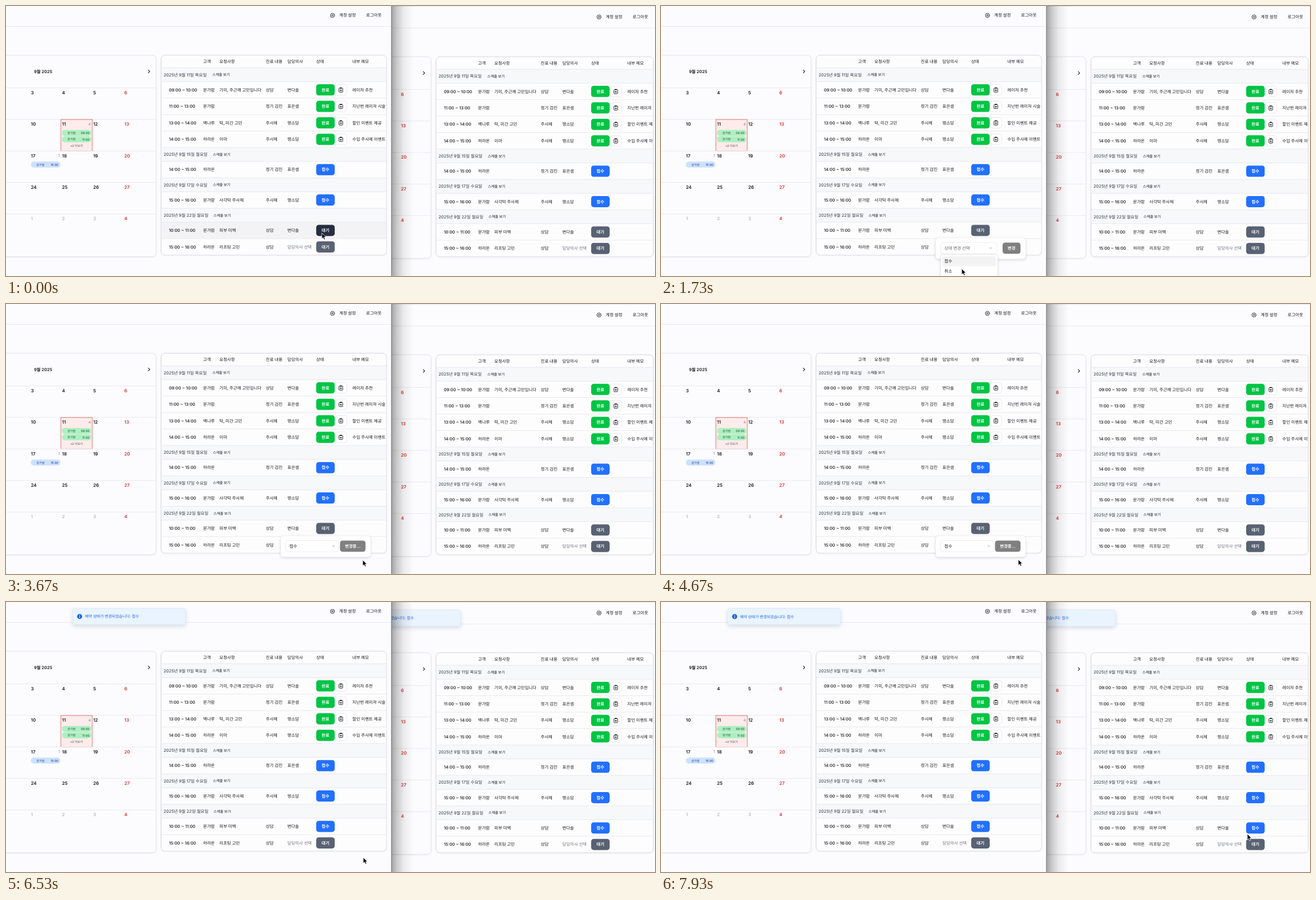
These frames come from a looping animation (1159 px wide and 483 px high, 8000 ms). An HTML page:

```html
<!DOCTYPE html>
<html lang="ko">
<head>
<meta charset="utf-8">
<title>예약 관리</title>
<style>
  html, body { margin: 0; width: 100%; height: 100%; overflow: hidden; background: #fcfbfd; }
  svg { display: block; width: 1159px; height: 483px; }
  text { font-family: Inter, 'Noto Sans CJK KR', 'Noto Sans CJK JP', sans-serif; text-rendering: geometricPrecision; white-space: pre; }
</style>
</head>
<body>
<svg id="stage" viewBox="0 0 1159 483"></svg>
<script>
const LOOP = 8000;
const INK = '#17171b', LINE = '#e9e9ee', RED = '#dc2f2f';
const GREEN = '#00c444', BLUE = '#2270ff', SLATE = '#596273', DARK = '#252f41';

const text = (x, cy, s, { size = 7.5, weight = 500, fill = INK, anchor = 'start' } = {}) =>
  `<text x="${x}" y="${cy + size * 0.365}" font-size="${size}" font-weight="${weight}" fill="${fill}" text-anchor="${anchor}">${s}</text>`;
const rect = (x, y, w, h, fill, r = 0, extra = '') =>
  `<rect x="${x}" y="${y}" width="${w}" height="${h}" rx="${r}" fill="${fill}" ${extra}/>`;
const hline = (x1, x2, y) => rect(x1, y - 0.5, x2 - x1, 1, LINE);
const stroke = (d, color, width = 1) =>
  `<path d="${d}" fill="none" stroke="${color}" stroke-width="${width}" stroke-linecap="round" stroke-linejoin="round"/>`;
const button = (x, cy, w, label, fill, id = '') =>
  `<g ${id && `id="${id}"`}>${rect(x, cy - 10, w, 20, fill, 4.5)}${text(x + w / 2, cy, label, { weight: 600, fill: '#fff', anchor: 'middle' })}</g>`;
const group = (id, body, attrs = '') => `<g id="${id}" ${attrs}>${body}</g>`;

function gear(cx, cy) {
  const points = [];
  for (let i = 0; i < 32; i++) {
    const a = (i + 0.5) * Math.PI / 16, r = i % 4 < 2 ? 4 : 3.1;
    points.push(`${cx + r * Math.cos(a)} ${cy + r * Math.sin(a)}`);
  }
  return stroke(`M${points.join('L')}Z`, '#222', 0.9) +
    `<circle cx="${cx}" cy="${cy}" r="1.3" fill="none" stroke="#222" stroke-width=".9"/>`;
}

function clipboard(cx, cy) {
  return rect(cx - 9.5, cy - 9.5, 20, 19, '#fff', 4.5, `stroke="${LINE}"`) +
    rect(cx - 3.3, cy - 3.3, 6.6, 7.4, 'none', 1, `stroke="${INK}" stroke-width=".95"`) +
    rect(cx - 1.6, cy - 4.4, 3.2, 2, INK, 0.6) +
    stroke(`M${cx - 1.4} ${cy + 0.8}h2.8M${cx} ${cy - 0.6}v2.8`, INK, 0.95);
}

// Rows with one entry are date headings.
const rows = [
  ['2025년 9월 11일 목요일'],
  ['09:00 ~ 10:00', '문가람', '기미, 주근깨 고민입니다', '상담', '변다솔', '완료', '레이저 추천'],
  ['11:00 ~ 13:00', '문가람', '', '정기 검진', '표은샘', '완료', '지난번 레이저 시술'],
  ['13:00 ~ 14:00', '백나루', '턱, 미간 고민', '주사제', '맹소담', '완료', '할인 이벤트 제공'],
  ['14:00 ~ 15:00', '하라온', '이마', '주사제', '맹소담', '완료', '수입 주사제 이벤트'],
  ['2025년 9월 15일 월요일'],
  ['14:00 ~ 15:00', '하라온', '', '정기 검진', '표은샘', '접수', ''],
  ['2025년 9월 17일 수요일'],
  ['15:00 ~ 16:00', '문가람', '사각턱 주사제', '주사제', '맹소담', '접수', ''],
  ['2025년 9월 22일 월요일'],
  ['10:00 ~ 11:00', '문가람', '피부 미백', '상담', '변다솔', '', ''],
  ['15:00 ~ 16:00', '하라온', '리프팅 고민', '상담', '담당의사 선택', '대기', ''],
];
const columns = [291, 352, 381, 464, 502.5, 554, 618.5];
const headings = ['', '고객', '요청사항', '진료 내용', '담당의사', '상태', '내부 메모'];

function table(side, right) {
  const left = 277, top = 88, bottom = 445.6;
  let y = 110.4;
  let body = headings.map((h, i) => text(columns[i], 99, h)).join('');
  for (const row of rows) {
    const isDate = row.length === 1, h = isDate ? 24.9 : 29.45, cy = y + h / 2;
    if (isDate) {
      const wide = row[0].includes('22일') ? 370.5 : row[0].includes('11일') ? 368.5 : 369.5;
      body += rect(left, y, right - left, h, '#f6f8fa') +
        text(281.5, cy, row[0], { weight: 400, fill: '#30353f' }) +
        text(wide, cy, '스케줄 보기', { size: 6.4 });
    } else {
      const pending = row[5] === '';
      if (pending) body += group(side + 'Hover', rect(left, y, right - left, h, '#f3f2f4'));
      row.forEach((cell, i) => {
        if (i === 5) return;
        const muted = cell.endsWith('선택');
        body += text(columns[i], cy, cell, muted ? { weight: 400, fill: '#6f7380' } : {});
      });
      if (pending) {
        body += button(554, cy, 33, '대기', SLATE, side + 'Wait') +
          button(554, cy, 33, '대기', DARK, side + 'WaitHover') +
          button(554, cy, 33, '접수', BLUE, side + 'Done');
      } else {
        body += button(554, cy, 33, row[5], { 완료: GREEN, 접수: BLUE, 대기: SLATE }[row[5]]);
      }
      if (row[5] === '완료') body += clipboard(598, cy);
    }
    body += hline(left, right, y);
    y += h;
  }
  const frame = fill => rect(left, top, right - left, bottom - top, fill, 7, 'stroke="#e1e2e8"');
  return `<clipPath id="${side}Table">${rect(left, top, right - left, bottom - top, '#000', 7)}</clipPath>
    <g filter="url(#soft)">${frame('#fdfdfe')}</g><g clip-path="url(#${side}Table)">${body}</g>${frame('none')}`;
}

function calendar(dayShift) {
  const weeks = [[3, 4, 5, 6], [10, 11, 12, 13], [17, 18, 19, 20], [24, 25, 26, 27], [1, 2, 3, 4]];
  let s = `<g filter="url(#soft)">${rect(-60, 88, 328, 360.5, '#fcfbfd', 7, 'stroke="#e3e3e9"')}</g>`;
  s += text(50, 117, '9월 2025', { weight: 600 }) + stroke('M254.2 114.6l2.5 2.5l-2.5 2.5', INK, 1.1);
  weeks.forEach((week, w) => {
    s += hline(-60, 268, 146.5 + w * 56.4);
    if (w === 1) s += rect(98, 203, 56, 56.5, '#fdeceb', 0, 'stroke="#d8766f"');
    week.forEach((day, d) => {
      const fill = d === 3 ? RED : w === 4 ? '#b9b9be' : INK;
      s += text(44.5 + d * 55.6 + dayShift, 154.8 + w * 56.4, day, { size: 8, weight: 600, fill });
    });
  });
  const pill = (x, y, time, fill, ink) => rect(x, y, 52.5, 10.6, fill, 5) +
    text(x + 10, y + 5.4, '문가람', { size: 5.2, fill: ink }) +
    text(x + 49, y + 5.4, time, { size: 5.3, fill: ink, anchor: 'end' });
  return s + pill(100, 221.8, '09:00', '#aeefc1', '#1c5a35') + pill(100, 233.2, '11:00', '#aeefc1', '#1c5a35') +
    pill(44.5, 278.3, '15:00', '#cce1fd', '#29478f') +
    text(126, 250.5, '+2 더보기', { size: 5.4, fill: '#55555b', anchor: 'middle' }) +
    text(151.5, 211.5, '4', { size: 7, weight: 400, fill: '#8c8c92', anchor: 'end' }) +
    text(96, 267.8, '1', { size: 7, weight: 400, fill: '#8c8c92', anchor: 'end' });
}

const toast = side => group(side + 'Toast',
  rect(119, 11.5, 201.5, 29, '#e9f4ff', 4, 'stroke="#d6e8fc" stroke-width=".8" filter="url(#toastShadow)"') +
  '<circle cx="131.5" cy="26" r="4.5" fill="#1d62e0"/>' +
  stroke('M131.5 25.8v2.4', '#fff', 1.1) + '<circle cx="131.5" cy="23.8" r=".7" fill="#fff"/>' +
  text(141, 26, '예약 상태가 변경되었습니다: 접수', { size: 6.9, fill: '#1d62e0' }));

function pane(side, { headerShift = 0, dayShift = 0, tableRight }) {
  return hline(-500, 700, 36.5) +
    `<g transform="translate(${headerShift} 0)">${gear(583, 16.8)}${text(595, 16.6, '계정 설정')}${text(643, 16.6, '로그아웃')}</g>` +
    calendar(dayShift) + table(side, tableRight) + toast(side);
}

const chevron = x => stroke(`M${x - 2} 432.2l2 2l2 -2`, '#9a9aa0', 0.9);
const field = w => rect(499.5, 423.2, w, 20, '#fff', 4, 'stroke="#ececef"');

function popover() {
  return group('popover',
    rect(490.5, 414.8, 160.5, 37.6, '#fff', 5, 'stroke="#ececef" stroke-width=".8" filter="url(#popShadow)"') +
    group('idle', field(100.5) + chevron(588.5) + group('placeholder', text(506, 433.2, '상태 변경 선택', { weight: 400, fill: '#66666c' })) +
      group('chosen', text(506, 433.2, '접수')) + button(610, 433.2, 32, '변경', '#808080', 'submitOff') + button(610, 433.2, 32, '변경', '#18181b', 'submitOn')) +
    group('busy', field(94.5) + chevron(585) + text(506, 433.2, '접수') + button(596.5, 433.2, 45.5, '변경중...', '#808080')) +
    group('dropdown', rect(499.5, 444.8, 101.5, 60, '#fff', 4, 'stroke="#ececef" filter="url(#popShadow)"') +
      rect(502.5, 447.5, 96, 18, '#f3f3f4', 3) + text(506, 456.6, '접수') + text(506, 474.6, '취소')));
}

const shadow = (id, dy, blur, color, opacity) =>
  `<filter id="${id}" x="-20%" y="-50%" width="140%" height="220%"><feDropShadow dx="0" dy="${dy}" stdDeviation="${blur}" flood-color="${color}" flood-opacity="${opacity}"/></filter>`;

const stage = document.getElementById('stage');
stage.innerHTML = `<defs>
    ${shadow('soft', 0.8, 0.8, '#000', 0.07)}${shadow('popShadow', 1.5, 2, '#000', 0.14)}${shadow('toastShadow', 3, 3, '#33506e', 0.17)}
    <clipPath id="leftPane">${rect(0, 0, 688, 483, '#000')}</clipPath>
    <clipPath id="rightPane">${rect(688, 0, 471, 483, '#000')}</clipPath>
    <linearGradient id="edge"><stop offset="0" stop-opacity=".36"/><stop offset=".25" stop-opacity=".2"/>
      <stop offset=".55" stop-opacity=".07"/><stop offset="1" stop-opacity="0"/></linearGradient>
  </defs>
  ${rect(0, 0, 1159, 483, '#fcfbfd')}
  <g clip-path="url(#rightPane)"><g transform="translate(491 2.8)">${pane('right', { headerShift: -15, dayShift: 3, tableRight: 665 })}</g>
    ${rect(688, 0, 471, 1, '#e6e6e9')}${rect(688, 0, 40, 483, 'url(#edge)')}</g>
  <g clip-path="url(#leftPane)">${rect(0, 0, 688, 483, '#fcfbfd')}${pane('left', { tableRight: 679.5 })}${popover()}</g>
  ${rect(687.8, 0, 1, 483, '#77777a')}
  <path id="cursor" d="M0 0V10.6L2.4 8.3L4.1 12.1L6 11.3L4.4 7.6H7.7Z" fill="#050505" stroke="#fff" stroke-width=".8" stroke-linejoin="round"/>`;

const el = id => document.getElementById(id);
const show = (id, on) => { el(id).style.display = on ? '' : 'none'; };
const clamp = v => Math.min(1, Math.max(0, v));

const cursorPath = [
  [0, 564, 406], [80, 564, 406], [400, 576, 402], [800, 576, 402], [1120, 574, 432], [1320, 574, 432],
  [1730, 537, 470], [1980, 534, 457], [2150, 534, 457], [2600, 625, 433], [2950, 625, 433],
  [3400, 637, 458], [3670, 637, 458], [4300, 638, 457], [6540, 638, 457], [6900, 1047, 415],
];

function cursorAt(t) {
  const next = cursorPath.findIndex(k => k[0] > t);
  if (next < 0) return cursorPath.at(-1).slice(1);
  const [t0, x0, y0] = cursorPath[next - 1], [t1, x1, y1] = cursorPath[next];
  const u = (t - t0) / (t1 - t0), e = u * u * (3 - 2 * u);
  return [x0 + (x1 - x0) * e, y0 + (y1 - y0) * e];
}

function render(t) {
  const hover = t < 960, chosen = t >= 2100, busy = t >= 2900, done = t >= 6180;
  show('leftHover', hover);
  show('rightHover', false);
  for (const side of ['left', 'right']) {
    const hot = side === 'left' && hover;
    show(side + 'Wait', !done && !hot);
    show(side + 'WaitHover', !done && hot);
    show(side + 'Done', done);
    const u = clamp((t - 6180) / 400), e = 1 - (1 - u) ** 3;
    show(side + 'Toast', done);
    el(side + 'Toast').setAttribute('transform', `translate(0 ${-42 * (1 - e)})`);
    el(side + 'Toast').setAttribute('opacity', e);
  }
  show('popover', t >= 450 && !done);
  show('idle', !busy);
  show('busy', busy);
  show('placeholder', !chosen);
  show('chosen', chosen);
  show('submitOff', !chosen);
  show('submitOn', chosen);
  show('dropdown', t >= 1260 && !chosen);
  el('cursor').setAttribute('transform', `translate(${cursorAt(t).join(' ')})`);
}

const start = performance.now();
function tick() {
  render((performance.now() - start) % LOOP);
  requestAnimationFrame(tick);
}
render(0);
requestAnimationFrame(tick);
</script>
</body>
</html>
```
